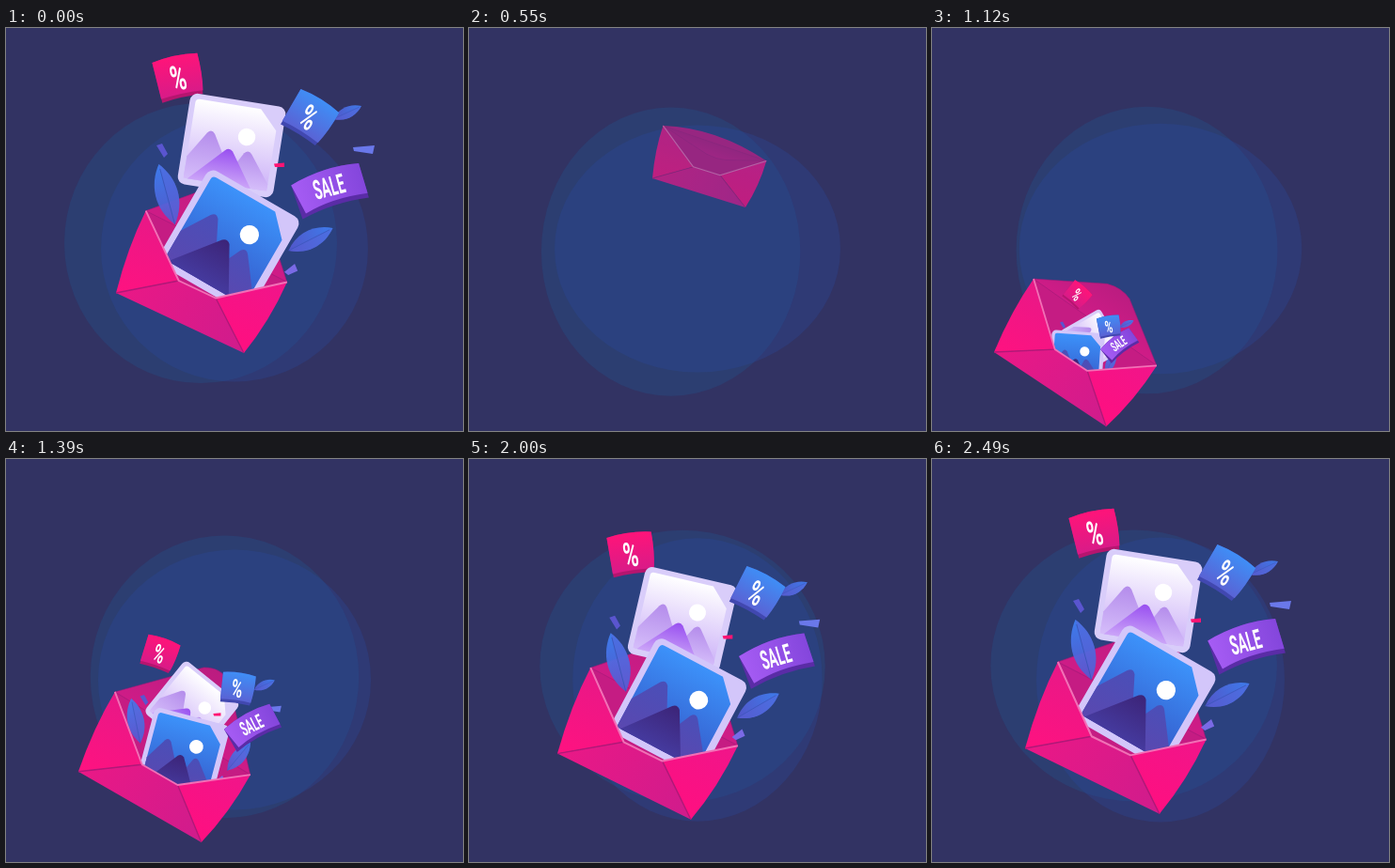
An HTML page for the animation above (2560 ms loop, 486x429 px).

```html
<!DOCTYPE html>
<html lang="en">
<head>
<meta charset="utf-8">
<title>Envelope sale</title>
<style>
  html, body { margin: 0; width: 100%; height: 100%; overflow: hidden; background: #323363; }
  svg { display: block; width: 100%; height: 100%; }
  text { font-family: Roboto, "Open Sans", sans-serif; font-weight: 700; fill: #fff; text-anchor: middle; }
</style>
</head>
<body>
<svg id="stage" viewBox="0 0 486 429" xmlns="http://www.w3.org/2000/svg">
  <defs id="defs"></defs>
  <rect width="486" height="429" fill="#323363"/>
  <ellipse id="blobA" fill="rgb(32,88,145)" opacity=".3"/>
  <ellipse id="blobB" fill="rgb(42,74,160)" opacity=".3"/>
  <g id="envelope">
    <g id="back"></g>
    <g id="items"></g>
    <g id="front"></g>
  </g>
</svg>
<script>
const LOOP = 2560, STEPS = 37;
// Times of the turning points, in steps
const GONE = 10, ENTER = 11, OPEN = 16, SETTLED = 36;

const $ = id => document.getElementById(id);
const clamp = (x, a = 0, b = 1) => Math.min(b, Math.max(a, x));
const mix = (a, b, k) => a + (b - a) * k;
const easeOut = (k, power) => 1 - (1 - clamp(k)) ** power;

function add(parent, tag, attrs) {
  const el = document.createElementNS("http://www.w3.org/2000/svg", tag);
  set(el, attrs);
  return parent.appendChild(el);
}
function set(el, attrs) {
  for (const k in attrs) el.setAttribute(k, attrs[k]);
}
let gradCount = 0;
function gradient(from, to, x2 = 0, y2 = 1) {
  const id = "g" + gradCount++;
  const g = add($("defs"), "linearGradient", { id, x1: 0, y1: 0, x2, y2 });
  add(g, "stop", { offset: 0, "stop-color": from });
  add(g, "stop", { offset: 1, "stop-color": to });
  return `url(#${id})`;
}
const shape = (g, d, fill, more = {}) => add(g, "path", { d, fill, ...more });

// Envelope, drawn from its left corner along its bottom edge
const back = $("back"), front = $("front");
shape(back, "M-9 -98Q75 -124 169 -93L104 -42.5H58Z", "#c51c83");
const flap = shape(back, "", gradient("#bb1c80", "#cf1c87"), { stroke: "#a01a78", "stroke-opacity": .6 });
shape(front, "M0 0L58 -42.5H104L159 0Z", gradient("#ea1886", "#cf1c8c", 1, 0));
shape(front, "M-9 -98Q-10 -52 0 0L58 -42.5Z", gradient("#e81887", "#ff1280"));
shape(front, "M159 0Q170 -45 169 -93L104 -42.5Z", gradient("#f0158a", "#ff0f80"));
shape(front, "M0 0L58 -42.5M159 0L104 -42.5", "none", { stroke: "#b01878", "stroke-width": 1.4 });
shape(front, "M-9 -98L58 -42.5H104L169 -93", "none",
  { stroke: "#f270b6", "stroke-width": 2, "stroke-linejoin": "round" });

const pose = (x, y, turn, size, squash = 1) => ({ x, y, turn, size, squash });
const below = pose(92, 450, 38, .5);
const opened = pose(66, 345, 33.6, .9);
const settled = pose(99, 308, 26, 1);
const lifted = pose(117, 282, 25.2, .945);
const closed = pose(195, 160, 17.4, .652, .89);

// Position and shape may follow different progress.
const blend = (a, b, k, kShape = k) => pose(
  mix(a.x, b.x, k), mix(a.y, b.y, k),
  mix(a.turn, b.turn, kShape), mix(a.size, b.size, kShape), mix(a.squash, b.squash, kShape));

function envelopeAt(s) {
  if (s < ENTER) return blend(lifted, closed, s / 8);
  if (s < OPEN) return blend(below, opened, easeOut((s - ENTER) / (OPEN - ENTER), 1.4));
  const k = (s - OPEN) / (SETTLED - OPEN);
  return blend(opened, settled, easeOut(k, 1.8), easeOut(k, 3));
}
const place = p => `translate(${p.x} ${p.y}) rotate(${p.turn}) scale(${p.size} ${p.size * p.squash})`;

// The point behind the front panel where the items hide
function pocket(p) {
  const a = p.turn * Math.PI / 180, x = 88 * p.size, y = -30 * p.size;
  return [p.x + x * Math.cos(a) - y * Math.sin(a), p.y + x * Math.sin(a) + y * Math.cos(a)];
}

const items = [];
function item(draw, from, to, turn, spin = 0, size = 1) {
  const el = add($("items"), "g", {});
  draw(el);
  items.push({ el, from, to, turn, spin, size });
}
const leaf = g => {
  shape(g, "M0 33C-17 12 -15 -14 0 -33C15 -14 17 12 0 33Z", gradient("#3f80f4", "#5657cf"), { opacity: .92 });
  shape(g, "M0 33C17 12 15 -14 0 -33Z", "#5a63d8", { opacity: .45 });
  shape(g, "M0 33V-28", "none", { stroke: "#3a55b8", "stroke-width": .8 });
};
const spark = (d, fill) => g => shape(g, d, fill);
const label = (g, str, size, narrow, y) => {
  add(g, "text", { "font-size": size, transform: `translate(0 ${y}) scale(${narrow} 1)` }).textContent = str;
};
const percent = (top, bottom, side) => g => {
  shape(g, "M-24 -21Q0 -26 25 -22Q26.5 0 22.5 22Q0 20 -21.5 23Z", side);
  shape(g, "M-24 -21Q0 -26 25 -22Q26.5 0 23.5 18Q0 16 -22 19Z", gradient(top, bottom));
  label(g, "%", 37, .62, 13);
};
const sale = g => {
  shape(g, "M-38.5 -14Q0 -25 37 -18L38 20Q0 15 -36 24Z", "#5a2ca6");
  shape(g, "M-38.5 -14Q0 -25 37 -18L38 15Q0 10 -31 19Z", gradient("#a65cf4", "#8446dc", 1, 0));
  label(g, "SALE", 29, .49, 8);
};
const photo = (rim, sky, far, near, extra = 0) => g => {
  const base = 41 + extra;
  add(g, "rect", { x: -50, y: -47.5, width: 100, height: 95 + extra, rx: 8, fill: rim });
  shape(g, `M-40 -42H24L43 -22V${base - 4}Q43 ${base} 39 ${base}H-40Q-44 ${base} -44 ${base - 4}V-38Q-44 -42 -40 -42Z`, sky);
  shape(g, `M-44 18L-27 -9Q-23 -14 -19 -9L10 ${base}H-44Z`, far);
  shape(g, `M-6 ${base}L14 6Q18 1 22 6L43 34V${base}Z`, far);
  shape(g, `M-40 ${base}L-6 6Q-2 2 2 6L26 ${base}Z`, near);
  add(g, "circle", { cx: 14, cy: -11, r: 9, fill: "#fff" });
};

item(leaf, [118, 324], [161, 203], -15, 6);
item(leaf, [190, 356], [314, 251], 63, -40, .8);
item(leaf, [207, 315], [353, 116], 65, 0, .5);
item(spark("M-6 -5L0 -7L6 4L2 8Z", "#5a55cf"), [139, 316], [156, 156], 0);
item(percent("#ff1479", "#d81b88", "#b5156f"), [154, 284], [173, 79], -11, 53);
item(photo("#d9cdfa", gradient("#fff", "#cbb0f8"), gradient("#b48ceb", "#d5bdfa"), gradient("#984ff0", "#cba4f8")),
  [170, 333], [230, 151], 9, 51, 1.03);
item(spark("M-6 -1.5L5 -2.5L5 2L-5 2Z", "#ff1473"), [176, 332], [281, 172], 0);
item(photo("#d3c6fa", gradient("#3c92fa", "#3558c8"), gradient("#4a4fb8", "#5a48b0"), gradient("#3c2478", "#453a9e"), 8),
  [154, 350], [229, 249], 30, -26, 1.13);
item(spark("M-12 -2L11 -4L9 5L-11 2Z", "#6a78ea"), [210, 332], [371, 155], 0);
item(spark("M-7 -2L7 -4L6 4L-5 3Z", "#7a6ae6"), [170, 377], [293, 284], -30);
item(sale, [199, 337], [334, 197], -15, -19);
item(percent("#3f8ef6", "#5a62d4", "#4148b0"), [188, 318], [312, 121], 33, -41, .98);

// Two soft discs that swell and sway on one slow wave
function drawBlobs(s) {
  const phase = s / 44 * 2 * Math.PI, wave = Math.sin(phase);
  set($("blobA"), {
    cx: 220 - 13 * Math.cos(phase), cy: 229 + 10 * wave, rx: 145 - 8 * wave, ry: 149 + 5 * wave
  });
  set($("blobB"), { cx: 243, cy: 235, rx: 142 + 11 * wave, ry: 141.5 - 11 * wave });
}

function drawFlap(s) {
  const tip = s < ENTER ? mix(1.85, .7, clamp((s - 3) / 4)) : Math.min(1.85, 1.5 + (s - OPEN) * .0875);
  const near = mix(1, tip, .88);
  const at = (a, b) => `${159 * a - 9 * b} ${-98 * b}`;
  set(flap, { d: `M${at(0, 1)}L${at(.5, near)}Q${at(.61, tip)} ${at(.7, near)}L${at(1.115, .95)}Z` });
}

function drawItems(s, env) {
  const leaving = s < ENTER;
  const k = leaving ? 1 : (s - OPEN) / (SETTLED - OPEN);
  const kx = easeOut(k, 2.8), ky = easeOut(k, 2.1), kTurn = easeOut(k, 2.4);
  const out = leaving ? 1 - clamp((s - 1) / 5) ** 1.5 : clamp((s - 13) / 3);
  const dx = leaving ? 10 + env.x - lifted.x : 0;
  const dy = leaving ? -26 + env.y - lifted.y : 0;
  const [px, py] = pocket(env);
  for (const { el, from, to, turn, spin, size } of items) {
    const x = mix(px, mix(from[0], to[0], kx) + dx, out);
    const y = mix(py, mix(from[1], to[1], ky) + dy, out);
    const scale = size * mix(.5, 1, kx) * mix(.15, 1, out);
    set(el, {
      transform: `translate(${x} ${y}) rotate(${turn + spin * (1 - kTurn)}) scale(${scale})`,
      visibility: out > 0 ? "visible" : "hidden"
    });
  }
}

function render(s) {
  const env = envelopeAt(s);
  drawBlobs(s);
  drawFlap(s);
  drawItems(s, env);
  set(back, { transform: place(env) });
  set(front, { transform: place(env) });
  set($("envelope"), { opacity: s < ENTER ? clamp((GONE - s) * .35) : s > ENTER ? 1 : 0 });
}

const start = performance.now();
function tick() {
  const t = (performance.now() - start) % LOOP;
  render(Math.min(STEPS - 1, Math.floor(t / LOOP * STEPS + .15)));
  requestAnimationFrame(tick);
}
tick();
</script>
</body>
</html>
```
